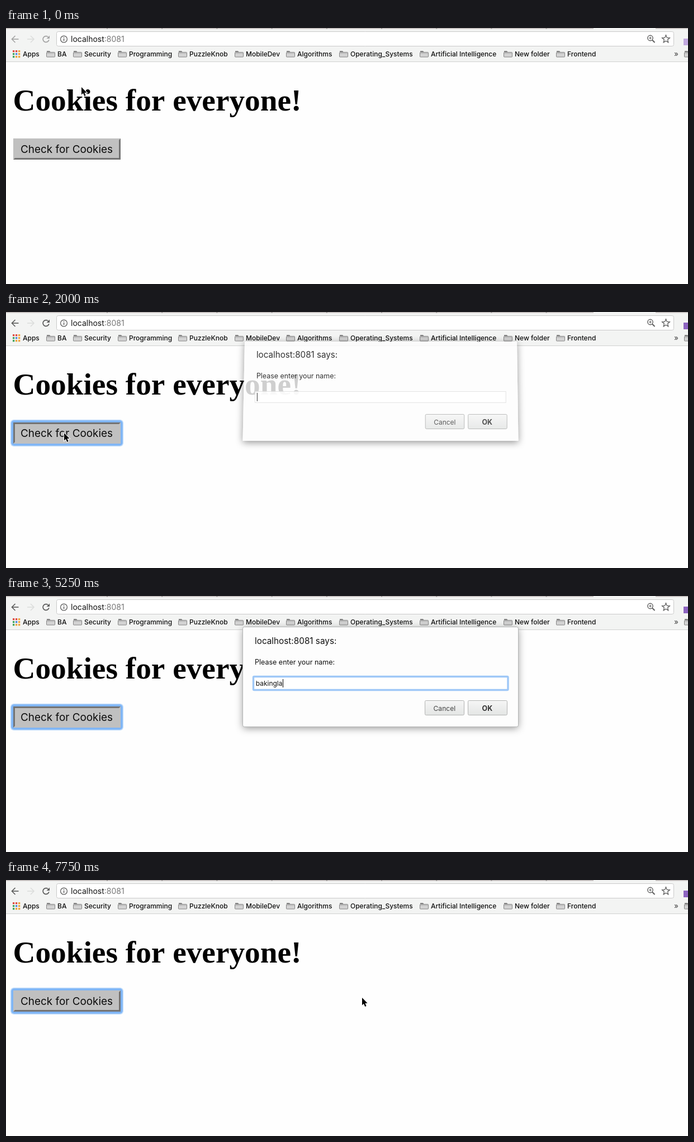
Animation, 1220 px wide and 459 px high, one loop 8 s. Source, as an HTML page with a canvas:

```html
<!DOCTYPE html>
<html lang="en">
<head>
<meta charset="utf-8">
<title>Cookies for everyone!</title>
<style>
  html, body { margin: 0; width: 100%; height: 100%; overflow: hidden; background: #fefefe; }
  canvas { display: block; }
</style>
</head>
<body>
<canvas id="stage" width="1220" height="459"></canvas>
<script>
const ctx = document.getElementById('stage').getContext('2d');
const LOOP = 8000, STEP = 250;
const SANS = 'Inter, Roboto, sans-serif';
const SERIF = '"Liberation Serif", "Noto Serif", serif';

const BOOKMARKS = [
  [72, 'BA'], [120, 'Security'], [200, 'Programming'], [308, 'PuzzleKnob'],
  [409, 'MobileDev'], [501, 'Algorithms'], [596, 'Operating_Systems'],
  [740, 'Artificial Intelligence'], [890, 'New folder'], [984, 'Frontend'], [1213, '']
];

// [time, x, y] of the pointer tip; null hides it while typing
const POINTER = [
  [0, 135, 106], [250, 118, 165], [500, 99, 216], [750, 98, 221], [1250, 101, 219],
  [1750, 104, 217], [2250, 118, 245], [2500, 133, 271], [3000, null],
  [6500, 133, 271], [6750, 620, 268], [7000, 776, 255], [7250, 844, 208], [7750, 637, 211]
];

// [time, characters of the name, typo]
const NAME = 'bakinglanterns';
const TYPING = [
  [0, 0, ''], [3000, 3, ''], [3500, 3, 'e'], [4000, 3, ''], [4250, 4, ''],
  [4500, 5, ''], [4750, 7, ''], [5250, 8, ''], [5500, 9, ''], [5750, 10, ''],
  [6000, 12, ''], [6250, 14, '']
];

const latest = (keys, t) => keys.filter(k => k[0] <= t).pop();

function rect(x, y, w, h, color) {
  ctx.fillStyle = color;
  ctx.fillRect(x, y, w, h);
}

function box(x, y, w, h, r, fill, stroke, width = 1) {
  ctx.beginPath();
  ctx.roundRect(x, y, w, h, r);
  if (fill) { ctx.fillStyle = fill; ctx.fill(); }
  if (stroke) { ctx.strokeStyle = stroke; ctx.lineWidth = width; ctx.stroke(); }
}

function shape(points, fill) {
  ctx.beginPath();
  points.forEach(([x, y]) => ctx.lineTo(x, y));
  ctx.closePath();
  if (fill) { ctx.fillStyle = fill; ctx.fill(); }
}

function line(points, color, width) {
  ctx.beginPath();
  points.forEach(([x, y]) => ctx.lineTo(x, y));
  ctx.strokeStyle = color;
  ctx.lineWidth = width;
  ctx.stroke();
}

function ring(x, y, r, color, width, from = 0, to = Math.PI * 2) {
  ctx.beginPath();
  ctx.arc(x, y, r, from, to);
  ctx.strokeStyle = color;
  ctx.lineWidth = width;
  ctx.stroke();
}

function text(str, x, y, size, color = '#111', weight = 400, family = SANS) {
  ctx.font = `${weight} ${size}px ${family}`;
  ctx.fillStyle = color;
  ctx.fillText(str, x, y);
}

function arrow(x, dir, color) {
  line([[x, 20], [x + 12 * dir, 20]], color, 1.6);
  line([[x + 6 * dir, 14], [x, 20], [x + 6 * dir, 26]], color, 1.6);
}

function folder(x) {
  shape([[x + 1, 41], [x + 6, 41], [x + 7.5, 43], [x + 15, 43], [x + 15, 46], [x + 1, 46]], '#8a8a8a');
  box(x + 0.5, 43.5, 15, 8.5, 1, '#d3d3d3', '#858585');
  line([[x + 1, 45.5], [x + 15, 45.5]], '#a5a5a5', 0.8);
}

function star(cx, cy, r) {
  const points = Array.from({ length: 10 }, (_, i) => {
    const a = i * Math.PI / 5 - Math.PI / 2, d = i % 2 ? r * 0.45 : r;
    return [cx + d * Math.cos(a), cy + d * Math.sin(a)];
  });
  shape(points);
  ctx.strokeStyle = '#5c5c5c';
  ctx.lineWidth = 1.3;
  ctx.stroke();
}

function drawToolbar(active) {
  const icon = active ? '#5a5a5a' : '#a3a3a3';
  rect(0, 0, 1220, 60, '#f3f4f3');
  rect(0, 0, 1051, 1.5, '#bdb7b6');
  rect(1162, 0, 58, 1.5, '#bdb7b6');
  for (let i = 0; i < 9; i++) rect(180 + i * 98.2, 0, 2, 1.5, '#8f8b8a');
  rect(0, 60, 1220, 1, '#d0d1d0');

  arrow(10.5, 1, icon);
  arrow(50, -1, '#dcdddc');
  ring(71.5, 20, 5.4, icon, 1.7, 0.2, Math.PI * 1.72);
  shape([[78, 13.5], [78, 19], [72.5, 19]], icon);

  box(90.5, 6.5, 1104, 26, 3, '#fff', '#c9c9c9');
  ring(103.5, 20, 5.9, '#5e5e5e', 1.3);
  rect(102.8, 19, 1.5, 4.3, '#5e5e5e');
  rect(102.8, 16.3, 1.5, 1.6, '#5e5e5e');
  text('localhost', 116, 25, 14, '#151515');
  const host = ctx.measureText('localhost').width;
  text(':8081', 116 + host, 25, 14, '#777');

  ring(1152.5, 18, 4.7, '#5c5c5c', 1.4);
  line([[1156, 21.5], [1160.5, 26]], '#5c5c5c', 2);
  line([[1150, 18], [1155, 18]], '#5c5c5c', 1);
  line([[1152.5, 15.5], [1152.5, 20.5]], '#5c5c5c', 1);
  star(1180.5, 20, 7.2);
  rect(1212, 19, 12, 12, active ? '#8d64c0' : '#c1a9df');

  const dots = ['#e0493e', '#e0493e', '#eda33a', '#3fa45b', '#4a86e0', '#eda33a', '#3fa45b', '#eda33a', '#eda33a'];
  dots.forEach((c, i) => rect(12 + i % 3 * 5, 40 + Math.floor(i / 3) * 5, 3.3, 3.3, c));
  text('Apps', 30, 51, 12, '#111', 500);
  for (const [x, label] of BOOKMARKS) {
    folder(x);
    text(label, x + 20, 51, 12, '#111', 500);
  }
  text('»', 1195, 50.5, 13, '#555', 500);
}

function drawPage(focused, pressed) {
  text('Cookies for everyone!', 12.5, 148, 55.3, '#000', 700, SERIF);
  if (focused) {
    box(8, 193, 202, 48, 6, '#b9d8fb');
    box(9.5, 194.5, 199, 45, 5, '#7fb5f5');
  }
  rect(13, 198, 192, 38, '#c0c0c0');
  const dark = '#737373';
  if (pressed) {
    shape([[13, 198], [205, 198], [202, 201], [16, 201], [16, 233], [13, 236]], dark);
  } else {
    shape([[205, 198], [205, 236], [13, 236], [16, 233], [202, 233], [202, 201]], dark);
  }
  text('Check for Cookies', 26, 224, 18.9, '#0a0a0a');
}

// Shadow is kept outside the panel so that it does not tint a translucent fill.
function drawPanel(corners, alpha) {
  ctx.save();
  shape(corners);
  ctx.rect(0, 0, 1220, 459);
  ctx.clip('evenodd');
  ctx.shadowColor = 'rgba(0,0,0,0.42)';
  ctx.shadowBlur = 13;
  ctx.shadowOffsetY = 3;
  shape(corners, '#fdfdfd');
  ctx.restore();

  ctx.save();
  ctx.globalAlpha = alpha;
  shape(corners, '#fdfdfd');
  ctx.restore();
}

function dialogButton(x, label, labelX, size, weight, color) {
  const shade = ctx.createLinearGradient(0, 187, 0, 214);
  shade.addColorStop(0, '#f6f6f6');
  shade.addColorStop(1, '#e3e5e4');
  box(x + 0.5, 187.5, 70, 26, 2, shade, '#b2b3b2');
  text(label, labelX, 205.5, size, color, weight);
}

function drawDialog(opening, name, hover) {
  ctx.save();
  if (opening) {
    drawPanel([[427, 53], [914, 53], [916.5, 231], [423.5, 231]], 0.82);
    ctx.globalAlpha = 0.85;
    ctx.translate(6, -4);
    ctx.scale(0.993, 1);
  } else {
    drawPanel([[424, 56], [916, 56], [916, 234], [424, 234]], 1);
    box(423.5, 55.5, 493, 179, 3, null, '#b3b5b5');
  }

  text('localhost:8081 says:', 445, 85.5, 15.3);
  text('Please enter your name:', 445, 123, 12.5);
  if (opening) {
    box(442.5, 146.5, 452, 20, 0, '#fff', '#dedede');
    rect(446, 149, 1, 15, '#111');
  } else {
    box(442.5, 144.5, 455.5, 24, 1.5, '#fff', '#9fc8f7', 3.4);
    if (name) {
      text(name, 446.7, 161, 12);
      rect(Math.round(447 + ctx.measureText(name).width), 149, 1, 15, '#000');
    }
  }
  dialogButton(749, 'Cancel', 764.5, 12.1, 400, '#444');
  dialogButton(826, 'OK', 851.5, 12.5, 700, hover ? '#000' : '#333');
  ctx.restore();
}

function drawPointer(x, y) {
  ctx.save();
  ctx.translate(x, y);
  shape([[0, 0], [0, 13.5], [3, 10.8], [5.2, 16], [7.6, 15], [5.4, 10], [9.5, 9.8]]);
  ctx.strokeStyle = '#fff';
  ctx.lineWidth = 2;
  ctx.stroke();
  ctx.fillStyle = '#000';
  ctx.fill();
  ctx.restore();
}

function draw(time) {
  const t = Math.floor(time % LOOP / STEP) * STEP;
  rect(0, 0, 1220, 459, '#fefefe');
  drawToolbar(t >= 500);
  drawPage(t >= 1500, t >= 1500 && t < 7750);
  if (t >= 2000 && t < 7750) {
    const [, count, typo] = latest(TYPING, t);
    drawDialog(t < 2250, NAME.slice(0, count) + typo, t >= 7250);
  }
  const [, x, y] = latest(POINTER, t);
  if (x !== null) drawPointer(x, y);
}

const start = performance.now();
function tick() {
  draw(performance.now() - start);
  requestAnimationFrame(tick);
}
tick();
</script>
</body>
</html>
```
